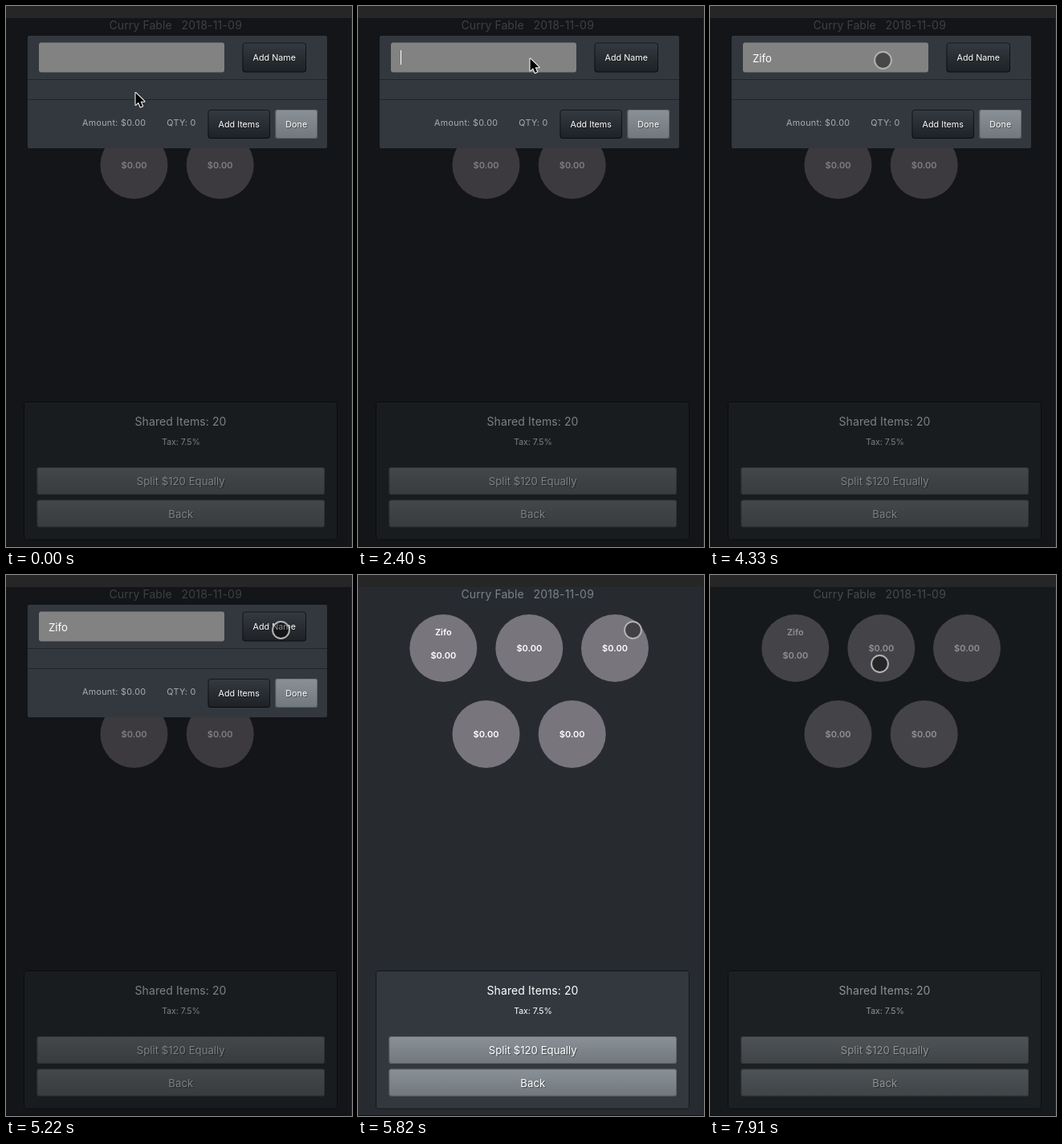
These frames come from a looping animation (431x673 px, 8 s). An HTML page with a canvas:

```html
<!DOCTYPE html>
<html lang="en">
<head>
<meta charset="utf-8">
<title>Bill splitter</title>
<style>
html, body { margin: 0; width: 100%; height: 100%; overflow: hidden; background: #272b30; }
canvas { display: block; width: 431px; height: 673px; }
</style>
</head>
<body>
<canvas id="stage"></canvas>
<script>
const W = 431, H = 673, LOOP = 8000;
const NAME = 'Zifo', PLACE = 'Curry Fable';
const LIGHT = [[0, '#8a9196'], [0.6, '#7a8288'], [1, '#70787d']];
const DARK = [[0, '#353a41'], [0.6, '#272b30'], [1, '#1e2125']];
const CIRCLES = [[106.3, 91], [213.3, 91], [320, 91], [159.5, 198], [266.7, 198]];
const ARROW = [[0, 0], [0, 15], [3.5, 11.8], [6, 17.6], [8.6, 16.5], [6.1, 10.8], [11, 10.8]];

const ARROW_PATH = [[161.5, 108], [163, 106], [171, 98], [186, 82], [204, 68], [216, 63], [217, 64], [214.5, 65.5]];
const BACK_PATH = [[342.5, 68.5], [324, 72], [262, 90], [203, 106], [211.5, 110.5]];

const dpr = window.devicePixelRatio || 1;
const stage = document.getElementById('stage');
const layer = document.createElement('canvas');
const [ctx, modalCtx] = [stage, layer].map(c => {
  c.width = W * dpr;
  c.height = H * dpr;
  const g = c.getContext('2d');
  g.scale(dpr, dpr);
  return g;
});

function text(g, str, x, y, size, o = {}) {
  g.save();
  g.font = `${o.weight || 400} ${size}px Inter, sans-serif`;
  g.letterSpacing = (o.spacing || 0) + 'px';
  g.textAlign = o.align || 'center';
  g.fillStyle = o.color || '#fff';
  if (o.shadow) {
    g.shadowColor = 'rgba(0,0,0,.45)';
    g.shadowOffsetX = g.shadowOffsetY = dpr;
    g.shadowBlur = dpr;
  }
  g.fillText(str, x, y + size * 0.364);
  const width = g.measureText(str).width;
  g.restore();
  return width;
}

function box(g, x, y, w, h, r, fill, border) {
  g.beginPath();
  g.roundRect(x, y, w, h, r);
  g.fillStyle = fill;
  g.fill();
  if (!border) return;
  g.beginPath();
  g.roundRect(x + 0.5, y + 0.5, w - 1, h - 1, r);
  g.strokeStyle = border;
  g.lineWidth = 1;
  g.stroke();
}

function button(g, label, x, y, w, h, size, stops) {
  const fill = g.createLinearGradient(0, y, 0, y + h);
  stops.forEach(([at, color]) => fill.addColorStop(at, color));
  box(g, x, y, w, h, 3, fill, stops === DARK ? 'rgba(0,0,0,.6)' : 'rgba(0,0,0,.2)');
  text(g, label, x + w / 2, y + h / 2 + 0.3, size, { shadow: true });
}

function drawPage(named) {
  ctx.fillStyle = '#272b30';
  ctx.fillRect(0, 0, W, H);
  const title = { color: '#7a8288', align: 'left', spacing: 0.1 };
  text(ctx, PLACE, 128.5, 23.5, 14, title);
  text(ctx, '2018-11-09', 218.5, 23.5, 14, { ...title, spacing: 0.2 });

  CIRCLES.forEach(([x, y], i) => {
    ctx.beginPath();
    ctx.arc(x, y, 42, 0, Math.PI * 2);
    ctx.fillStyle = '#78757d';
    ctx.fill();
    const first = named && i === 0;
    if (first) text(ctx, NAME, x, 71.2, 11, { weight: 600 });
    text(ctx, '$0.00', x, first ? 99.5 : y + 0.3, 11, { weight: 600 });
  });

  box(ctx, 22, 492, 391, 172.5, 3, '#32383e', 'rgba(0,0,0,.6)');
  text(ctx, 'Shared Items: 20', 217.5, 517, 14, { spacing: 0.1 });
  text(ctx, 'Tax: 7.5%', 218, 542, 10.5);
  button(ctx, 'Split $120 Equally', 38.5, 574, 358.5, 34, 13.2, LIGHT);
  button(ctx, 'Back', 38.5, 614.5, 358.5, 34, 13.2, LIGHT);
}

function drawModal(typed, caret) {
  const g = modalCtx;
  g.clearRect(0, 0, W, H);
  box(g, 27, 37, 373, 140, 2, '#32383e');
  g.fillStyle = 'rgba(0,0,0,.35)';
  g.fillRect(27, 91, 373, 1);
  g.fillRect(27, 116, 373, 1);

  box(g, 41, 45.5, 231, 37, 3, '#828282');
  const width = typed ? text(g, typed, 53, 65, 13.2, { align: 'left' }) : 0;
  if (caret) {
    g.fillStyle = '#fff';
    g.fillRect(Math.round(53 + width), 55, 1, 18);
  }
  button(g, 'Add Name', 294.5, 45.5, 79.5, 37, 10.75, DARK);
  button(g, 'Add Items', 251.5, 129, 77.5, 36, 10.75, DARK);
  button(g, 'Done', 335.5, 129, 52.5, 36, 10.75, LIGHT);
  const label = { color: '#aaadb0', align: 'left', spacing: 0.3 };
  text(g, 'Amount: $0.00', 95, 144.8, 10.75, label);
  text(g, 'QTY: 0', 200.3, 144.8, 10.75, label);
}

function drawArrow([x, y]) {
  ctx.beginPath();
  ARROW.forEach(([dx, dy]) => ctx.lineTo(x + dx, y + dy));
  ctx.closePath();
  ctx.lineJoin = 'round';
  ctx.lineWidth = 2;
  ctx.strokeStyle = '#fff';
  ctx.stroke();
  ctx.fillStyle = '#000';
  ctx.fill();
}

function drawTouch([x, y]) {
  ctx.beginPath();
  ctx.arc(x, y, 10.4, 0, Math.PI * 2);
  ctx.fillStyle = 'rgba(0,0,0,.45)';
  ctx.fill();
  ctx.lineWidth = 2;
  ctx.strokeStyle = '#b2b2b2';
  ctx.stroke();
}

// Number of ticks passed since start, limited to max
function tick(t, start, step, max) {
  return Math.max(0, Math.min(max, Math.floor((t - start) / step) + 1));
}

// Dips below the straight line on the way to the button
function touchAt(t) {
  if (t >= 6420) return BACK_PATH[tick(t, 6420, 150, 4)];
  const p = tick(t, 4340, 146.6, 7) / 7;
  const e = p * p * (3 - 2 * p);
  return [215.5 + 127 * e, 67.5 + e + 148 * e * (1 - e)];
}

function within(t, ...spans) {
  return spans.some(([from, to]) => t >= from && t < to);
}

function drawScene(t) {
  const closing = within(t, [5670, 5820]);
  drawPage(t >= 5670);

  const shade = t < 5670 ? 0.5 : closing ? 0.16 : t >= 7910 ? 0.43 : 0;
  ctx.fillStyle = `rgba(0,0,0,${shade})`;
  ctx.fillRect(0, 0, W, H);

  if (t < 5820) {
    const letters = [2690, 2840, 2990, 3590].filter(at => t >= at).length;
    const caret = within(t, [1350, 1950], [2400, 4190], [4640, 5220]);
    drawModal(NAME.slice(0, letters), caret);
    ctx.globalAlpha = closing ? 0.3 : 1;
    ctx.drawImage(layer, 0, closing ? -19 : 0, W, H);
    ctx.globalAlpha = 1;
  }

  // Window frame around the page
  ctx.fillStyle = '#262626';
  ctx.fillRect(0, 0, W, 15);
  ctx.fillRect(430, 0, 1, H);
  ctx.fillStyle = '#101112';
  ctx.fillRect(0, 672, 430, 1);

  if (t < 2550) drawArrow(ARROW_PATH[tick(t, 150, 150, 7)]);
  else drawTouch(touchAt(t));
}

const begin = performance.now();
function loop() {
  drawScene((performance.now() - begin) % LOOP);
  requestAnimationFrame(loop);
}
loop();
</script>
</body>
</html>
```
